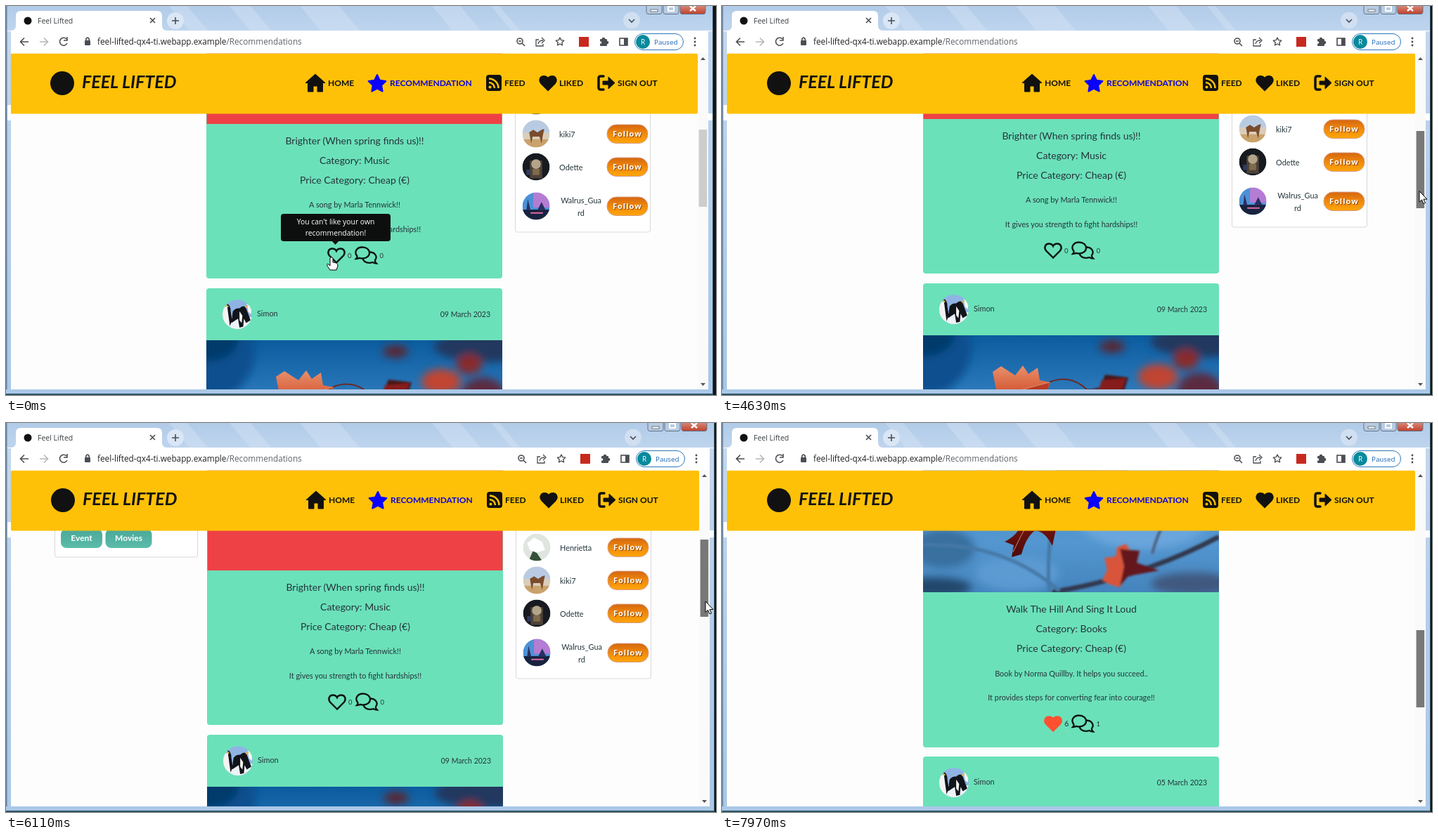
An HTML page that plays this animation: 1010 by 554 pixels, repeating every 8 s.

```html
<!DOCTYPE html>
<html lang="en">
<head>
<meta charset="utf-8">
<title>Feel Lifted</title>
<style>
html, body { margin: 0; width: 100%; height: 100%; overflow: hidden; background: #fdfdfd; }
svg { display: block; }
.ui { font-family: "Open Sans", "Noto Sans", sans-serif; }
.web { font-family: Lato, "Open Sans", sans-serif; fill: #24343a; }
.title { font-size: 14px; }
.small { font-size: 10.9px; }
.nav { font-size: 12px; font-weight: 700; fill: #111; }
.follow { font: 700 11px "Open Sans", sans-serif; letter-spacing: 1px; fill: #fff; text-shadow: 1px 1px 1px #8a4200; }
.line { fill: none; stroke: #4a4d51; stroke-width: 1.6; }
.wide .mid { transform: translate(1px, 0); }
.wide .far { transform: translate(2px, 0); }
</style>
</head>
<body>
<svg id="stage" width="1010" height="554" viewBox="0 0 1010 554"></svg>
<script>
const LOOP = 8000;
const stage = document.getElementById('stage');

const rect = (x, y, w, h, fill, more = '') => `<rect x="${x}" y="${y}" width="${w}" height="${h}" fill="${fill}" ${more}/>`;
const path = (d, more = '') => `<path d="${d}" ${more}/>`;
const circle = (x, y, r, fill, more = '') => `<circle cx="${x}" cy="${y}" r="${r}" fill="${fill}" ${more}/>`;
const blob = (x, y, rx, ry, fill) => `<ellipse cx="${x}" cy="${y}" rx="${rx}" ry="${ry}" fill="${fill}"/>`;
const text = (x, y, str, cls = '', more = '') => `<text x="${x}" y="${y}" class="${cls}" ${more}>${str}</text>`;
const centred = (y, str, cls, x = 496) => text(x, y, str, cls, 'text-anchor="middle"');
const at = (x, y, inner, more = '') => `<g transform="translate(${x} ${y}) ${more}">${inner}</g>`;
const gradient = (id, ...colors) => `<linearGradient id="${id}" x2="0" y2="1">${
  colors.map((c, i) => `<stop offset="${i / (colors.length - 1)}" stop-color="${c}"/>`).join('')}</linearGradient>`;

const HEART = 'M13 21.5L3 11.5C-.5 7 2 1.5 7 1.5C10 1.5 12 3 13 5C14 3 16 1.5 19 1.5C24 1.5 26.5 7 23 11.5Z';
const BUBBLES = 'M2 18C4 16 4 15 3 13.5C-1 8 3 1.5 11 1.5C17 1.5 21 5 21 9.5C21 14 17 17.5 11 17.5Q9 17.5 7 16.8Q5 18 2 18Z' +
  'M22 8.5C29 9 33 15 29 20Q28.5 22 31 24.5Q28 24.5 25.5 23C20 25 14 23.5 12 19';

const defs = `<defs>
  ${gradient('glass', '#b1cbe8', '#bfd5ee')}
  ${gradient('side', '#c4d7ed', '#b4cde9', '#a9c7e8')}
  ${gradient('orange', '#d5660f', '#f08a0c', '#ffa60a')}
  ${gradient('teal', '#4aa898', '#5bbcaa')}
  ${gradient('close', '#e0a396', '#c0402b')}
  ${gradient('sky', '#0b5c9f', '#2876b8', '#4a90cd', '#5496d0', '#4484bd')}
  ${gradient('ember', '#e9906c', '#d04a26', '#a82010')}
  ${gradient('maple', '#b8391c', '#7d1710', '#4c0a0a')}
  <clipPath id="disc"><circle r="20"/></clipPath>
  <clipPath id="photo"><rect x="286" y="126" width="421" height="281"/></clipPath>
  <filter id="soft" x="-50%" y="-50%" width="200%" height="200%"><feGaussianBlur stdDeviation="6"/></filter>
  <filter id="haze" x="-20%" y="-20%" width="140%" height="140%"><feGaussianBlur stdDeviation="1.6"/></filter>
</defs>`;

const avatar = (x, y, r, bg, inner) =>
  at(x, y, `<g clip-path="url(#disc)">${circle(0, 0, 20, bg)}${inner}</g>`, `scale(${r / 20})`);

const penguins = y => avatar(329, y, 21, '#8fb4e4',
  rect(-20, 4, 40, 16, '#eef2f8') +
  path('M-20-8Q-14-14-11-6L-8 6L-12 18H-20Z', 'fill="#f3f4f2"') +
  path('M-14-14Q-9-13-9-4L-7 8L-10 16Q-12 2-14-14ZM-6-4Q-2-9 3-8Q9-14 12-8L18 8L12 12L9 6L8 17L3 18L1 6L-8 12Z', 'fill="#11141a"') +
  path('M3-4L7 2L6 12L3 8ZM13-14L19-10L19 0L15-3Z', 'fill="#f6f6f2"') +
  path('M-15-12L-12-10M11-9L14-12', 'stroke="#e3b53a" stroke-width="2"'));

const icons = (y, liked, comments, heart) =>
  at(457, y, path(HEART, `fill="${heart || 'none'}" stroke="${heart || '#0c1512'}" stroke-width="2.4"`)) +
  at(496, y - 2, path(BUBBLES, 'fill="none" stroke="#0c1512" stroke-width="2.3" stroke-linecap="round"')) +
  text(486, y + 15, liked, '', `font-size="${liked ? 11 : 9.5}"`) + text(531.5, y + 15, comments, '', 'font-size="9.5"');

const card = (y, h) => rect(285, y, 421, h, '#6be1b9', 'rx="4"');
const author = (y, date) => penguins(y) + text(357, y + 3, 'Simon', 'small') +
  text(689, y + 4, date, '', 'font-size="10.5" text-anchor="end"');
const heading = (y, name, category) => centred(y, name, 'title') +
  centred(y + 28, 'Category: ' + category, 'title') + centred(y + 56, 'Price Category: Cheap (€)', 'title');

const leaves = at(-1, 350, `<g clip-path="url(#photo)">
  ${rect(286, 126, 421, 281, 'url(#sky)')}
  <g filter="url(#soft)">
    ${blob(295, 140, 60, 70, '#07508f')}${blob(286, 126, 45, 30, '#063a6c')}
    ${blob(600, 300, 95, 45, '#6aa6dc')}${blob(420, 380, 60, 25, '#5b9ad2')}
    ${blob(335, 280, 45, 14, '#4580b4')}${blob(315, 345, 45, 28, '#38709f')}
    ${blob(300, 400, 55, 14, '#24466c')}${blob(670, 395, 60, 16, '#40597f')}
    ${blob(685, 135, 75, 22, '#20385e')}${blob(620, 185, 28, 18, '#c04430')}
    ${blob(660, 160, 18, 14, '#8a2c2c')}${blob(680, 205, 32, 26, '#5c2c40')}
    ${blob(655, 238, 30, 14, '#463452')}${blob(690, 235, 14, 14, '#9a3434')}
    ${blob(695, 270, 14, 22, '#4a3048')}${blob(555, 142, 18, 9, '#5a2630')}
  </g>
  <g fill="none" filter="url(#haze)">
    ${path('M470 407Q600 385 707 328', 'stroke="#33384e" stroke-width="7"')}
    ${path('M612 352Q625 300 660 270L707 244M560 235Q600 260 640 292', 'stroke="#4f5f80" stroke-width="4"')}
    ${path('M286 340Q400 335 480 405M468 320Q462 370 466 407', 'stroke="#4478a6" stroke-width="5"')}
    ${path('M520 205L538 200L545 182L578 186L569 215L579 236L555 254L541 250L534 272L520 288L518 272L501 270L512 248L496 244L470 240L488 215Z', 'fill="#4a1418"')}
    ${path('M540 190L575 187L565 214L572 235L545 246L530 225Z', 'fill="#861f1a"')}
    ${path('M541 390L548 375L544 358L560 356L562 343L575 338L580 347L594 348L590 365L600 376L578 380L566 400L552 396Z', 'fill="#d8553a"')}
    ${path('M566 345L580 347L594 348L590 365L622 376L578 384L566 398L572 370Z', 'fill="#64151a"')}
  </g>
  <g fill="none" stroke="#2c1c28">
    ${path('M286 305Q345 308 408 286', 'stroke-width="2.5"')}
    ${path('M520 204Q600 205 707 232', 'stroke-width="3"')}
    ${path('M465 193Q495 180 520 204Q500 232 470 268', 'stroke="#6a2a26" stroke-width="2"')}
  </g>
  ${path('M354 233L374 221L362 211Q378 212 390 203L385 178L397 170L417 183L428 169L436 181L449 172L452 190L467 193L461 210L466 238Q452 222 437 228Q424 240 417 262L404 239Q394 228 380 236Z', 'fill="url(#ember)"')}
  ${path('M410 209L466 193L461 210L466 238Q452 222 437 228Q424 240 417 262L404 239Z', 'fill="#a01c10" opacity=".55"')}
  ${path('M360 230Q410 205 466 193', 'fill="none" stroke="#d88a66"')}
  ${path('M432 240L456 247L472 238L492 245L489 275Q470 284 472 300L476 312L470 341Q458 318 444 320Q432 330 426 353L412 357L415 340L402 335Q428 322 425 300L395 290L387 268L410 270Q422 258 449 258Z', 'fill="url(#maple)"')}
  ${path('M387 268L410 270Q422 258 449 258L470 262L430 310Q432 300 425 300L395 290Z', 'fill="#d0603c"')}
  ${path('M414 350Q436 300 465 272L488 245', 'fill="none" stroke="#d08a6a"')}
</g>`);

const user = (y, bg, art, name) => avatar(754, y, 19.5, bg, art) +
  (name ? text(787, y + 5, name, 'small') : centred(y - 4, 'Walrus_Gua', 'small', 818) + centred(y + 14, 'rd', 'small', 818)) +
  rect(855, y - 13, 58, 26.5, 'url(#orange)', 'rx="13" stroke="#d79a86"') +
  text(863, y + 4, 'Follow', 'follow');

const people = rect(724.5, -400, 192, 722, '#fff', 'rx="3" stroke="#d9d9d9"') +
  user(135, '#dfe5df', path('M-12 20L-4 2L8 20Z', 'fill="#35503a"') +
    path('M-14-6L-4-14L8-8L12 4L0 8L-10 4Z', 'fill="#fff"'), 'Henrietta') +
  user(182, '#d9cdbb', rect(-20, -20, 40, 18, '#b9cbe2') + rect(-20, 8, 40, 12, '#c9a26c') +
    path('M-10-2L-4-6L2-2L8-6L12-7L10 2L8 14L5 4L-5 4L-7 14Z', 'fill="#7a4c2c"'), 'kiki7') +
  user(229, '#171a20', rect(-9, -9, 18, 26, '#4d4238') + circle(0, -4, 7, '#b3a48a') +
    rect(-5, 3, 10, 9, '#7f6b4a') + rect(-14, 4, 5, 8, '#2d3c66'), 'Odette') +
  user(285, '#4c91d6', rect(-4, -20, 24, 22, '#b57cd4') +
    path('M-20 5H20V20H-20Z', 'fill="#18233f"') + path('M-14 6L-12-10L-8 6ZM2 6L8-6L14 6Z', 'fill="#2a2f60"') +
    path('M-8 10H10', 'stroke="#e06aa6" stroke-width="2"'));

const topic = (x, w, name) => rect(x, 109, w, 27, 'url(#teal)', 'rx="8"') +
  text(x + w / 2, 126, name, 'nav', 'text-anchor="middle" style="fill:#fff"');

const content = `<g class="mid web"><g id="scroll">
  ${rect(68.5, -400, 203, 549, '#fff', 'rx="3" stroke="#d9d9d9"')}
  ${topic(77, 59, 'Event')}${topic(140.5, 66, 'Movies')}
  ${people}
  ${card(-400, 788)}${rect(285.5, -400, 420, 568, '#ee4146')}
  ${heading(197, 'Brighter (When spring finds us)!!', 'Music')}
  ${centred(287, 'A song by Marla Tennwick!!', 'small')}
  ${centred(322, 'It gives you strength to fight hardships!!', 'small')}
  ${icons(344, 0, 0)}
  ${card(402, 576)}${author(439, '09 March 2023')}${leaves}
  ${heading(786, 'Walk The Hill And Sing It Loud', 'Books')}
  ${centred(877, 'Book by Norma Quillby. It helps you succeed..', 'small')}
  ${centred(911, 'It provides steps for converting fear into courage!!', 'small')}
  ${icons(933, 6, 1, '#ff5030')}
  ${card(991, 576)}${author(1028, '05 March 2023')}
</g></g>`;

const tooltip = `<g id="tip" class="ui" font-size="10.4">
  ${rect(391, 296, 156, 39, '#0d0f0f', 'rx="4"')}${path('M463 334H474L468.5 340Z', 'fill="#0d0f0f"')}
  <g fill="#fff">${centred(311, "You can't like your own", '', 469)}${centred(327, 'recommendation!', '', 469)}</g>
</g>`;

const star = Array.from({ length: 10 }, (_, i) => {
  const a = i * Math.PI / 5, r = i % 2 ? 6.5 : 13;
  return `${(r * Math.sin(a)).toFixed(2)},${(-r * Math.cos(a)).toFixed(2)}`;
}).join(' ');
const starShape = (x, y, more) => at(x, y, `<polygon points="${star}" stroke-linejoin="round" ${more}/>`);

const header = `<g class="far">${rect(5, 67.5, 979, 86, '#ffc107', 'rx="2"')}</g>
<g class="mid web">
  ${circle(80, 110, 17, '#111')}
  ${text(108, 117, 'FEEL LIFTED', 'nav', 'style="font-size:25px;font-style:italic"')}
  ${at(426, 97, path('M14 0L28 12.5H24.5V25H17V17H11V25H3.5V12.5H0Z', 'fill="#111" stroke="#111" stroke-linejoin="round"'))}
  ${text(458, 114, 'HOME', 'nav')}
  ${starShape(528, 111, 'fill="#0a00ff" stroke="#0a00ff" stroke-width="2"')}
  ${text(546, 114, 'RECOMMENDATION', 'nav', 'style="fill:#0a00e0"')}
  ${rect(683, 98, 22, 23, '#111', 'rx="4"')}
  ${path('M687 103.5A13.5 13.5 0 0 1 700.5 117M687 109A8 8 0 0 1 695 117', 'fill="none" stroke="#ffc107" stroke-width="2.5"')}
  ${circle(688.5, 115.5, 2, '#ffc107')}
  ${text(709, 114, 'FEED', 'nav')}
  ${at(758, 98.5, path(HEART, 'fill="#111" stroke="#111" stroke-width="2"'))}
  ${text(787, 114, 'LIKED', 'nav')}
  ${path('M850 100H846Q843 100 843 103V116Q843 119 846 119H850', 'fill="none" stroke="#111" stroke-width="3.5" stroke-linecap="round"')}
  ${path('M849 107H857V101L866 109.5L857 118V112H849Z', 'fill="#111" stroke="#111" stroke-linejoin="round"')}
  ${text(870, 114, 'SIGN OUT', 'nav')}
</g>`;
const shade = `<g class="mid">${rect(285, 153, 421, 18, '#000', 'id="shade" opacity=".08"')}</g>`;

const stripe = (x, w) => path(`M${x} 0h${w}l30 36h${-w}Z`, 'fill="#d3e2f4" opacity=".45"');
const chrome = `<g class="ui">
  ${rect(0, 0, 1010, 36, 'url(#glass)')}
  ${[[232, 26], [318, 30], [418, 56], [606, 40], [690, 12]].map(s => stripe(...s)).join('')}
  ${rect(0, 35, 1010, 32.5, '#fff')}
  ${path('M7 35Q14 35 14 28V14Q14 7 21 7H215Q222 7 222 14V28Q222 35 229 35Z', 'fill="#fff"')}
  ${circle(31, 21, 5.5, '#111')}
  ${text(45, 24.5, 'Feel Lifted', '', 'font-size="10.5" fill="#3c4043"')}
  ${path('M205 17L212 24M212 17L205 24', 'class="line"')}
  ${circle(241, 21, 12, '#d9e6f5')}${path('M236 21H246M241 16V26', 'class="line"')}
  ${path('M32 51H21M26 45.5L20.5 51L26 56.5', 'class="line"')}
  ${path('M48 51H59M54 45.5L59.5 51L54 56.5', 'class="line" style="stroke:#b5b7ba"')}
  ${path('M86 47A5.5 5.5 0 1 0 87 53M87 44V49H82', 'class="line"')}
  ${rect(112, 49, 8, 7, '#4a4d51', 'rx="1"')}${path('M113.8 49V47Q116 43 118.2 47V49', 'class="line"')}
  ${text(130, 55, 'feel-lifted-qx4-ti.webapp.example<tspan fill="#5f6368">/Recommendations</tspan>', '', 'font-size="11.75" fill="#202124"')}
</g>`;

const caption = (x, w, fill) => rect(x, -5, w, 16.5, fill, 'rx="3" stroke="#60748c"');
const farSide = `<g class="far ui">
  ${rect(984, 67, 15, 480, '#fafafa')}
  ${path('M988 77H995L991.5 73ZM988 537H995L991.5 541Z', 'fill="#555"')}
  ${rect(985.6, 176, 11.6, 110, '#cdcdcd', 'id="thumb"')}
  ${rect(999, 36, 6, 518, 'url(#side)')}${rect(999, 153, 6, 10, '#fff')}
  ${rect(1005, 0, 1.5, 554, '#35586b')}${rect(1006, 0, 10, 554, '#111419')}
  ${caption(911, 22, '#b9cbe0')}${caption(935, 22, '#b9cbe0')}${caption(959, 36, 'url(#close)')}
  ${rect(917, 5, 10, 3, '#fff', 'stroke="#55606e" stroke-width=".8"')}
  ${rect(942, 1, 8, 6, 'none', 'stroke="#fff" stroke-width="2"')}
  ${path('M973 0L981 7M981 0L973 7', 'stroke="#fff" stroke-width="2.5"')}
  ${circle(890, 20.5, 12, '#d0dff1')}${path('M886 19L890 23L894 19', 'class="line"')}
  ${circle(731, 50, 4, 'none', 'class="line"')}${path('M734 53L738 57M729 50H733', 'class="line"')}
  ${path('M758 48H754V57H764V54M757 54Q758 49 764 49M762 45L766 49L762 53', 'class="line" style="stroke-width:1.3"')}
  ${at(788, 51, `<g transform="scale(.46)">${starShape(0, 0, 'fill="none" stroke="#4a4d51" stroke-width="3"')}</g>`)}
  ${rect(815, 44, 14, 14, '#c8291e')}
  ${rect(845, 47, 10, 10, '#4a4d51', 'rx="1"')}${circle(850, 47, 2.3, '#4a4d51')}${circle(855, 52, 2.3, '#4a4d51')}${circle(845.5, 52, 1.8, '#fff')}
  ${rect(873, 46, 11, 10, 'none', 'stroke="#4a4d51" stroke-width="1.6"')}${rect(879, 46, 5, 10, '#4a4d51')}
  ${rect(894.5, 39.5, 69, 23, '#fff', 'rx="11.5" stroke="#2b77b8"')}
  ${circle(906, 51, 10, '#078a9c')}${text(906, 54.5, 'R', '', 'fill="#fff" font-size="10" text-anchor="middle"')}
  ${text(922, 54.5, 'Paused', '', 'font-size="9.8" fill="#1967b8"')}
  ${[46, 51, 56].map(y => circle(980, y, 1.4, '#4a4d51')).join('')}
</g>`;

const edges = rect(0, 36, 7, 518, 'url(#side)') + rect(2, 141, 5, 22, '#fff') +
  rect(0, 0, 1.5, 554, '#66819c') +
  `<g class="far">${rect(-2, 546, 1007, 6, '#abc8e8')}${rect(-2, 552, 1008, 2, '#2c5666')}</g>`;

const cursors = `<g id="cursor" fill="#fff" stroke="#000" stroke-linejoin="round">
  ${path('M-2 1Q0-2 2 1V7L7 8Q9 9 9 12L7 18H-2L-6 12Q-7 8-4 10L-2 12Z', 'id="hand"')}
  ${path('M0 0V15.5L3.5 12.3L6 18L8.5 17L6 11.5H11Z', 'id="arrow"')}
  ${path('M-10 0L-5-5V-1.5H5V-5L10 0L5 5V1.5H-5V5Z', 'id="resize"')}
</g>`;

stage.innerHTML = defs + rect(0, 0, 1010, 554, '#fdfdfd') + content + tooltip + shade + header + chrome + farSide + edges + cursors;

// first change, last change, steps, then cursor x, cursor y and page offset reached
const moves = [
  [120, 240, 3, 478, 357, 0],
  [1550, 1550, 1, 475, 355, 0],
  [1615, 1680, 2, 459, 357, 0],
  [2040, 2270, 5, 664, 345, 0],
  [2460, 2640, 4, 931, 271, 0],
  [2810, 3290, 8, 997, 230, 0],
  [3680, 4010, 6, 999, 230, 0],
  [4280, 4380, 2, 992, 262, 0],
  [4630, 4780, 3, 992, 267, -22.5],
  [4860, 5080, 4, 988, 200, -22.5],
  [5150, 5150, 1, 988, 195, 240],
  [5200, 5410, 4, 988, 186, 335],
  [5480, 5560, 2, 988, 181, 357],
  [5990, 6110, 3, 995, 254, 42],
  [6170, 6230, 2, 996, 266, -5],
  [6400, 6660, 5, 1004, 330, -320],
  [6940, 6940, 1, 1009, 336, -350],
  [7010, 7470, 8, 1014, 378, -505],
  [7970, 7970, 1, 1014, 380, -516]
];

function poseAt(t) {
  let pose = [463, 358, 0];
  for (const [first, last, steps, ...goal] of moves) {
    if (t < first) break;
    const done = steps === 1 ? 1 : Math.min(steps, 1 + Math.floor((t - first) / (last - first) * (steps - 1) + 1e-6)) / steps;
    pose = pose.map((v, i) => v + (goal[i] - v) * done);
  }
  return pose;
}

const el = id => document.getElementById(id);
const show = (id, on) => el(id).setAttribute('visibility', on ? 'visible' : 'hidden');

function draw() {
  const t = performance.now() % LOOP;
  const [x, y, offset] = poseAt(t);
  el('scroll').setAttribute('transform', `translate(0 ${Math.round(offset)})`);
  el('cursor').setAttribute('transform', `translate(${x} ${y})`);
  el('thumb').setAttribute('y', Math.round(176 - offset / 4.35));
  el('thumb').setAttribute('fill', t < 3150 ? '#cdcdcd' : t < 4380 ? '#a8a8a8' : '#787878');
  stage.classList.toggle('wide', t >= 3800);
  const resizing = t >= 3220 && t < 4280;
  show('hand', t < 2040);
  show('arrow', t >= 2040 && !resizing);
  show('resize', resizing);
  show('tip', t < 2150);
  show('shade', t >= 4700 && t < 5150);
  requestAnimationFrame(draw);
}
draw();
</script>
</body>
</html>
```
